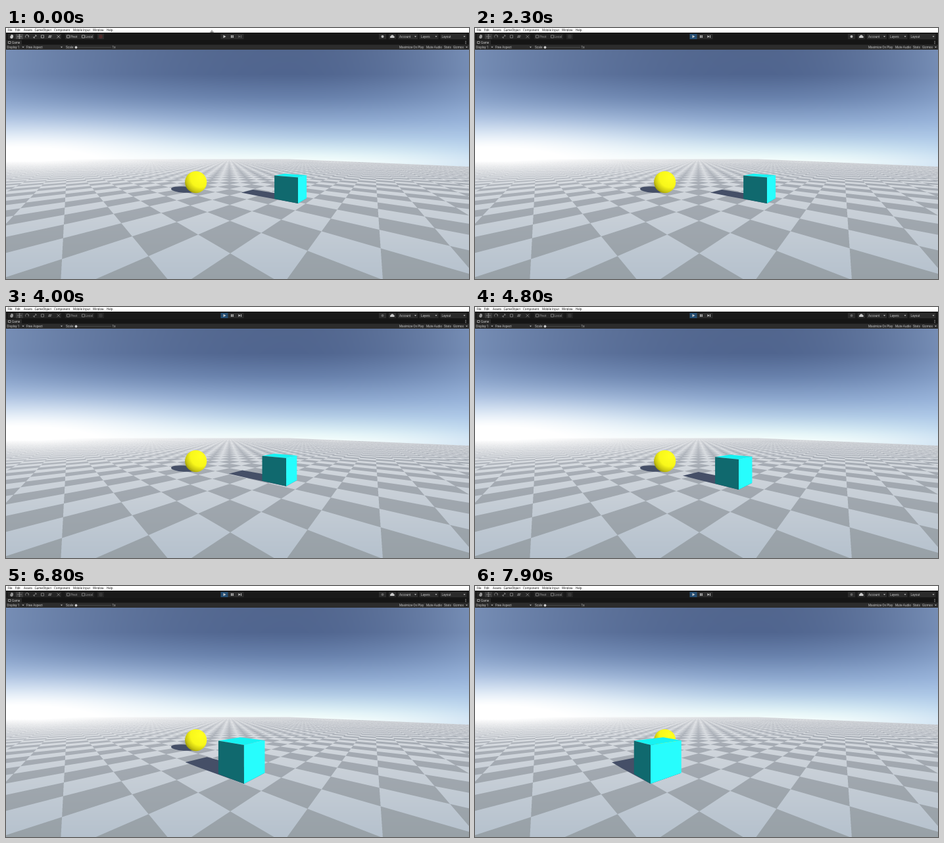
These frames come from a looping animation (704 px wide and 382 px high, 8 s). An HTML page with a canvas:

```html
<!DOCTYPE html>
<html lang="en">
<head>
<meta charset="utf-8">
<title>Game view</title>
<style>
html, body { margin: 0; width: 100%; height: 100%; overflow: hidden; background: #191919; }
canvas, svg { position: absolute; left: 0; top: 0; width: 704px; height: 382px; }
text { font: 4.7px Roboto, "Liberation Sans", sans-serif; fill: #c2c2c2; }
.menu text { font: 4.4px "Open Sans", "Liberation Sans", sans-serif; fill: #111; }
.line { fill: none; stroke: #b0b0b0; stroke-width: .8; }
.box { fill: #2b2b2b; }
.light { fill: #c8c8c8; }
.cursor { animation: cursor 8s linear infinite; }
.hover { opacity: 0; animation: hover 8s step-end infinite; }
.pressed { opacity: 0; animation: pressed 8s step-end infinite; }
.step { animation: step 8s step-end infinite; }
.edit { animation: dim 8s step-end infinite; }
.mark { animation: mark 8s step-end infinite; }
.badge { animation: badge 8s step-end infinite; }
@keyframes cursor {
  0% { transform: translate(313px, 5px); opacity: 1; }
  11.2% { transform: translate(332px, 12px); opacity: 1; }
  11.3%, 100% { transform: translate(332px, 12px); opacity: 0; }
}
@keyframes hover { 0% { opacity: 0; } 11.25% { opacity: 1; } 15%, 100% { opacity: 0; } }
@keyframes pressed { 0% { opacity: 0; } 15%, 100% { opacity: 1; } }
@keyframes step { 0% { opacity: .4; } 15%, 100% { opacity: 1; } }
@keyframes dim { 0% { opacity: 1; } 15%, 100% { opacity: .72; } }
@keyframes mark { 0% { stroke: #6a2c2c; } 15%, 100% { stroke: #444; } }
@keyframes badge { 0% { opacity: .9; } 33.75%, 100% { opacity: .35; } }
</style>
</head>
<body>
<canvas id="view" width="704" height="382"></canvas>
<svg viewBox="0 0 704 382">
  <rect width="704" height="33" fill="#191919"/>
  <rect width="704" height="7" fill="#fff"/>
  <g class="menu">
    <text x="2.5" y="5.2">File</text><text x="14" y="5.2">Edit</text>
    <text x="27" y="5.2">Assets</text><text x="43.5" y="5.2">GameObject</text>
    <text x="73" y="5.2">Component</text><text x="102" y="5.2">Mobile Input</text>
    <text x="132" y="5.2">Window</text><text x="153" y="5.2">Help</text>
  </g>
  <rect y="18.5" width="704" height="7" fill="#151515"/>
  <rect y="18.5" width="24" height="7" fill="#292929"/>
  <rect y="25.5" width="704" height="7.5" fill="#2c2c2c"/>

  <g class="edit">
    <path class="box" d="M3 9h81v8H3zM90 9h44v8H90zM139 9h10v8h-10z"/>
    <rect x="15" y="9" width="11" height="8" fill="#484848"/>
    <path class="light" d="M7 12l1-2 1 0 2 1v3l-1.500 2h-2l-1.500-2z"/>
    <path class="line" d="M17 13h7M20.500 9.700v6.600M19.500 10.700l1-1 1 1M19.500 15.300l1 1 1-1
      M30 14.500a2.500 2.500 0 1 1 4 0M34 11v2M42 15l4-4M44 11h2v2M42 13v2h2M53.500 11h4v4h-4z
      M65 15l1-4M68 11l-1 4M65 12h5M64 14h5M77.500 10.800l4.500 4.500M82 10.800l-4.500 4.500M92.500 11h4v4h-4zM115.500 11h4v4h-4z"/>
    <text x="98" y="14.8">Pivot</text><text x="120.500" y="14.8">Local</text>
  </g>
  <path class="line mark" d="M142 11h4v4h-4zM142 13h4M144 11v4"/>

  <rect class="box" x="326.500" y="9" width="35" height="8"/>
  <rect class="hover" x="326.500" y="9" width="11" height="8" fill="#606060"/>
  <rect class="pressed" x="326.500" y="9" width="11" height="8" fill="#244d72"/>
  <path class="light" d="M330.500 10.700l4 2.300-4 2.300zM342 11h1.400v4H342zM344.400 11h1.400v4h-1.400z"/>
  <path class="light step" d="M353.500 11l3 2-3 2zM357 11h.9v4h-.9z"/>

  <path class="box" d="M567 9h11v8h-11zM582 9h11v8h-11zM596 9h30v8h-30zM628.500 9h29v8h-29zM660.500 9h40v8h-40z"/>
  <circle class="light badge" cx="572.500" cy="13" r="2"/>
  <path class="light" d="M584.500 15a1.500 1.500 0 0 1 .5-2.700 2.400 2.400 0 0 1 4.600 0 1.400 1.400 0 0 1 .3 2.700z"/>
  <text x="598" y="14.8">Account</text><text x="631" y="14.8">Layers</text><text x="662.500" y="14.8">Layout</text>
  <path class="light" d="M621 12.300h3l-1.500 1.700zM652.500 12.300h3l-1.500 1.700zM695.500 12.300h3l-1.500 1.700z"/>

  <path class="line" d="M3.500 20.500h3.500v3h-3.500z"/>
  <text x="9" y="24">Game</text>
  <path class="light" d="M698.500 19.700h1v1h-1zM698.500 21.500h1v1h-1zM698.500 23.300h1v1h-1z"/>
  <text x="1.500" y="31">Display 1</text><text x="31" y="31">Free Aspect</text>
  <path class="light" d="M24.500 28.500h3l-1.500 1.700zM83 28.500h3l-1.500 1.700zM699 28.500h3l-1.500 1.700z"/>
  <text x="91" y="31">Scale</text>
  <path d="M106 29.500h54" stroke="#505050" stroke-width=".7"/>
  <circle class="light" cx="106.500" cy="29.500" r="1.900"/>
  <text x="161.500" y="31">1x</text>
  <text x="598" y="31">Maximize On Play</text><text x="639" y="31">Mute Audio</text>
  <text x="666" y="31">Stats</text><text x="680" y="31">Gizmos</text>
  <path class="cursor" d="M-3 1H3M0-2V2" stroke="#333" stroke-width=".7"/>
</svg>
<script>
const W = 704, H = 382, TOP = 33, LOOP = 8000;
const CX = 352, HORIZON = 198, FOCAL = 232, EYE = 1.7, SIZE = .975;
const ctx = document.getElementById('view').getContext('2d');

// World axes on the ground, seen from the turned camera
const YAW = 48.1 * Math.PI / 180;
const AXIS_L = [-Math.sin(YAW), Math.cos(YAW)];
const AXIS_R = [Math.cos(YAW), Math.sin(YAW)];

const clamp = v => Math.max(0, Math.min(1, v));
const mix = (a, b, k) => a.map((v, i) => v + (b[i] - v) * k);
const dot = (a, b) => a[0] * b[0] + a[1] * b[1];
const move = (p, d, k = 1) => [p[0] + d[0] * k, p[1] + d[1] * k];
const project = ([x, z], y = 0) => [CX + FOCAL * x / z, HORIZON + FOCAL * (EYE - y) / z];
const unproject = (sx, sy) => {
  const z = FOCAL * EYE / (sy - HORIZON);
  return [(sx - CX) * z / FOCAL, z];
};

// Value at t on a list of [t, ...values] stops
function along(stops, t) {
  const i = stops.findIndex(s => s[0] > t);
  if (i < 0) return stops.at(-1).slice(1);
  if (i === 0) return stops[0].slice(1);
  const a = stops[i - 1], b = stops[i];
  return mix(a.slice(1), b.slice(1), (t - a[0]) / (b[0] - a[0]));
}

const SKY = [
  [33, 82, 102, 142], [70, 80, 101, 143], [105, 103, 128, 171], [140, 140, 167, 206],
  [165, 176, 202, 228], [182, 208, 230, 241], [193, 230, 246, 248], [202, 244, 254, 252]
];

function skyColor(x, y) {
  const side = x < 430 ? (430 - x) / 430 : (x - 430) / 274;
  const base = mix(along(SKY, y), [168, 196, 234], .42 * side * side);
  const glow = Math.exp(-(((x - 20) / 270) ** 2) - ((y - 208) / 56) ** 2);
  return mix(base, [255, 255, 255], clamp(glow * 1.25));
}

const CORNER = unproject(341, 343);

function isDark(sx, sy) {
  const p = move(unproject(sx, sy), CORNER, -1);
  return (Math.floor(dot(p, AXIS_L)) + Math.floor(dot(p, AXIS_R))) % 2 === 0;
}

function floorColor(x, y) {
  let dark = 0;
  for (let j = 0; j < 6; j++)
    for (let i = 0; i < 3; i++) dark += isDark(x + (i + .5) / 3, y + (j + .5) / 6);
  const d = Math.max(y + .5 - HORIZON, .5);
  const near = clamp(d / 184);
  const light = mix([222, 224, 227], [181, 193, 205], near ** .8);
  const shade = mix([168, 173, 182], [152, 161, 167], near);
  const tile = mix(light, shade, dark / 18);
  const haze = mix(tile, [221, 223, 226], Math.exp(-d / 11));
  const glow = Math.exp(-d / 17) * clamp(1.15 - x / 340);
  return mix(haze, [255, 255, 255], clamp(glow * 1.3));
}

function paintScene() {
  const image = ctx.createImageData(W, H);
  for (let y = TOP; y < H; y++)
    for (let x = 0; x < W; x++) {
      const edge = 199.5 + Math.max(0, x - 430) * .042;
      const cover = clamp(y + 1 - edge);
      let c = cover < 1 ? skyColor(x, y) : floorColor(x, y);
      if (cover > 0 && cover < 1) c = mix(c, floorColor(x, y), cover);
      image.data.set([...c, 255], (y * W + x) * 4);
    }
  ctx.putImageData(image, 0, 0);
}

function polygon(points, color) {
  ctx.fillStyle = color;
  ctx.beginPath();
  points.forEach(p => ctx.lineTo(...p));
  ctx.closePath();
  ctx.fill();
}

const SHADE = '#454f67';

function paintSphere() {
  ctx.fillStyle = SHADE;
  ctx.beginPath();
  ctx.ellipse(270.5, 246, 19.5, 4.7, .06, 0, 7);
  ctx.fill();
  const g = ctx.createRadialGradient(296, 227, 2, 296, 227, 28);
  g.addColorStop(0, '#ffff20');
  g.addColorStop(.52, '#f8f71a');
  g.addColorStop(.8, '#c9c612');
  g.addColorStop(1, '#8f8c0c');
  ctx.fillStyle = g;
  ctx.beginPath();
  ctx.arc(288.7, 234.6, 16.6, 0, 7);
  ctx.fill();
}

// Screen position of the cube's nearest ground corner
const PATH = [
  [2600, 444, 267], [3100, 439, 269], [3500, 435, 270], [4400, 419, 275],
  [4800, 401, 278], [5300, 397, 284], [6000, 391, 288], [6200, 389, 289],
  [6800, 362, 301], [7100, 337, 301], [7900, 267, 301]
];
const SHADOW = [-1.36, 1.14];

function paintCube(t) {
  const front = unproject(...along(PATH, t));
  const left = move(front, AXIS_L, SIZE), right = move(front, AXIS_R, SIZE);
  const back = move(left, AXIS_R, SIZE);
  const ground = p => project(p), top = p => project(p, SIZE);
  const cast = p => project(move(p, SHADOW));
  polygon([ground(front), cast(front), cast(left), cast(back), ground(back), ground(right)], SHADE);
  polygon([top(left), top(back), top(right), top(front)], '#16f2f2');
  polygon([top(left), top(front), ground(front), ground(left)], '#10696e');
  polygon([top(front), top(right), ground(right), ground(front)], '#27fdfd');
}

paintScene();
paintSphere();
const still = ctx.getImageData(0, 0, W, H);
const start = performance.now();

function frame() {
  ctx.putImageData(still, 0, 0);
  paintCube((performance.now() - start) % LOOP);
  requestAnimationFrame(frame);
}
frame();
</script>
</body>
</html>
```
